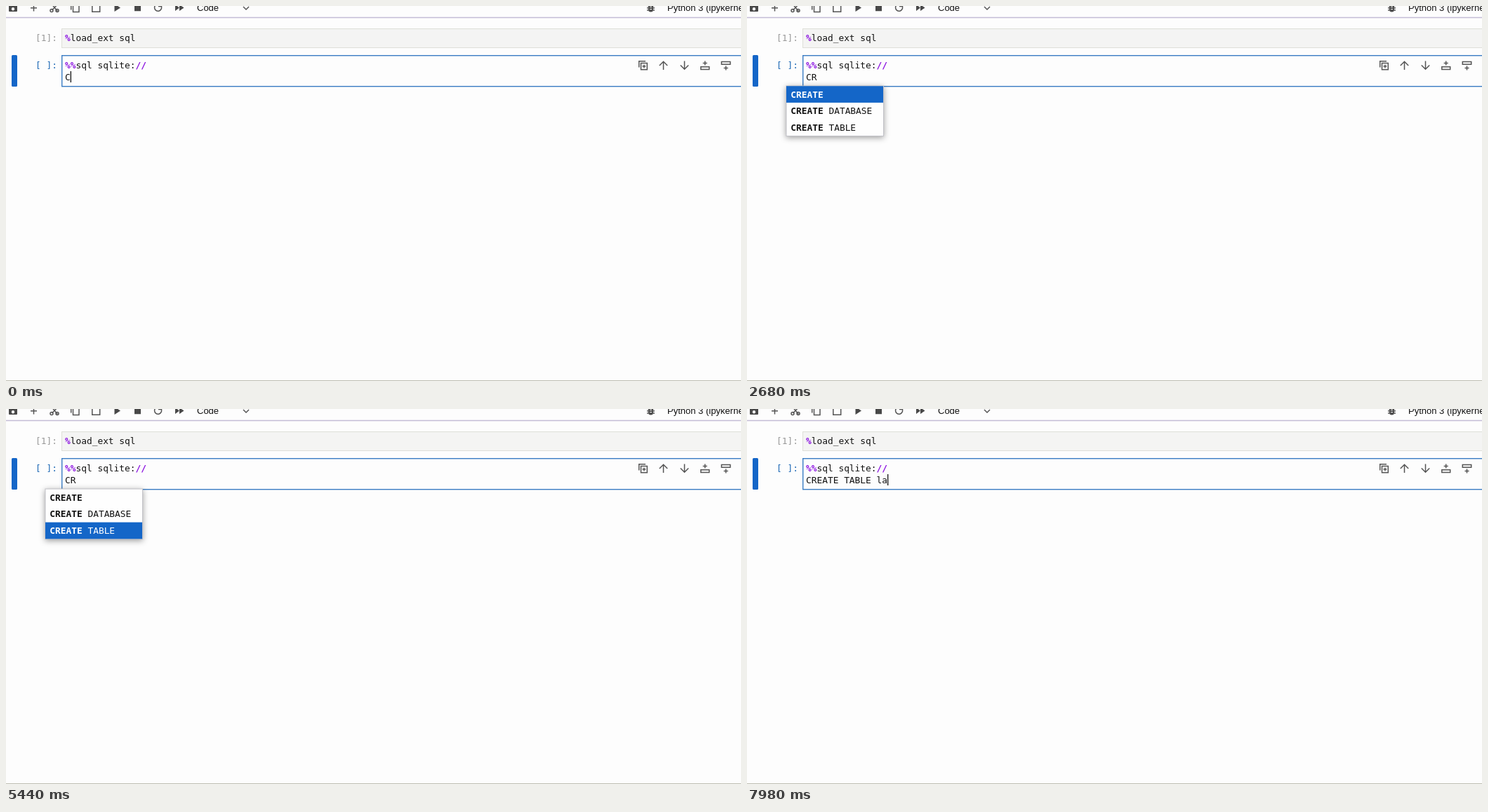
Write an HTML page that moves like this. It is 1047 by 535 pixels and loops after 8 s.

```html
<!DOCTYPE html>
<html lang="en">
<head>
<meta charset="utf-8">
<title>SQL completion in a notebook</title>
<style>
  html, body { margin: 0; width: 100%; height: 100%; overflow: hidden; background: #fdfdfd; }
  svg { display: block; }
  text { white-space: pre; }
  .code { font: 12.85px "DejaVu Sans Mono", monospace; fill: #111; }
  .ui { font: 13px "Liberation Sans", Arial, sans-serif; fill: #111; }
  .op { font-weight: bold; fill: #8a10e0; }
  .match { font-weight: bold; }
  .line { fill: none; stroke: #555; stroke-width: 1.5; }
  .solid { fill: #484848; }
  #popup { filter: drop-shadow(0 2px 4px rgba(0, 0, 0, .38)); }
</style>
</head>
<body>
<svg width="1047" height="535" viewBox="0 0 1047 535">
  <rect width="1047" height="535" fill="#fdfdfd"/>

  <!-- notebook toolbar -->
  <path class="solid" fill-rule="evenodd" d="M4-4H13L16-1V7Q16 8 15 8H5Q4 8 4 7ZM10 2A2.2 2.2 0 1 0 10 6.400A2.200 2.200 0 1 0 10 2Z"/>
  <path class="line" d="M39.500-2V7.500M35 2.700H44"/>
  <g class="line">
    <path d="M64-4L73.500 7.500M75-4L65.500 6"/>
    <circle cx="65" cy="6.500" r="2"/><circle cx="73" cy="6.500" r="2"/>
    <path d="M95.500-2H104V8.500H95.500ZM92.700-4V5.500"/>
    <path d="M122.800-3H133.700V8.300H122.800Z"/>
    <path d="M221 0A5 5 0 1 1 218-2.500M221.500-4V.5H217"/>
    <path d="M338 1L342 5L346 1"/>
  </g>
  <path class="solid" d="M154.500-3V8L163 2.500ZM183-2H192V7.200H183ZM241-2V7L247 2.500ZM247-2V7L253.500 2.500Z"/>
  <text class="ui" x="272" y="7">Code</text>
  <rect class="solid" x="915" y="-4" width="7" height="12.500" rx="3.500"/>
  <path class="line" d="M913-.5H924M913 2.700H924M913 6H924"/>
  <path d="M917 1.300H920M917 4.500H920" stroke="#fdfdfd"/>
  <text class="ui" x="942" y="7">Python 3 (ipykernel)</text>
  <path d="M0 16.500H1047" stroke="#c3bcd6" stroke-width="1.500"/>

  <!-- executed cell -->
  <rect x="79.500" y="32.500" width="980" height="27" fill="#f4f4f3" stroke="#dedfd8"/>
  <text class="code" x="73" y="50" text-anchor="end" style="fill:#999">[1]:</text>
  <text class="code" x="84" y="50"><tspan class="op">%</tspan>load_ext sql</text>

  <!-- active cell -->
  <rect x="8" y="70" width="8" height="45" rx="1.500" fill="#1466c8"/>
  <rect x="79.700" y="70.700" width="980" height="44" fill="#fdfdfd" stroke="#3a7cc4" stroke-width="1.400"/>
  <text class="code" x="73" y="88.500" text-anchor="end" style="fill:#1c68b5">[ ]:</text>
  <text class="code" x="84" y="88.500"><tspan class="op">%%</tspan>sql sqlite:<tspan class="op">//</tspan></text>
  <text class="code" id="typed" x="84" y="105.500"></text>
  <rect id="caret" y="93" width="1.200" height="16" fill="#000"/>
  <g class="line">
    <path d="M901.700 87.500V78.700H911M904.500 81.500H913.300V90.700H904.500ZM908.900 83.700V88.500M906.500 86.100H911.300"/>
    <path d="M936.500 91V79.500M930.800 85L936.500 79.300L942.200 85"/>
    <path d="M966.500 78.500V90M960.800 84.500L966.500 90.200L972.200 84.500"/>
    <path d="M989.800 86.700H1001.700V90.500H989.800ZM995.700 78.500V84.500M992.700 81.500H998.700"/>
    <path d="M1019.300 79.500H1031.700V83.300H1019.300ZM1025.500 85.500V91.500M1022.500 88.500H1028.500"/>
  </g>

  <g id="popup">
    <rect x="56" y="114" width="138.500" height="71.500" fill="#fefefe" stroke="#c2c2c8"/>
    <rect id="selection" x="56" width="138" height="23.700" fill="#1466c8"/>
    <g id="options"></g>
  </g>
  <path d="M0 534.500H1047" stroke="#bdbdb2"/>
</svg>
<script>
const LOOP = 8000;
const CHAR_WIDTH = 7.74;
const ROW_HEIGHT = 23.7;
const $ = id => document.getElementById(id);

// Each track is a list of [start time in ms, value].
const typing = [[0, "C"], [200, "CR"], [5780, "CREATE TABLE"], [7280, "CREATE TABLE "],
                [7560, "CREATE TABLE l"], [7840, "CREATE TABLE la"]];
const choice = [[0, -1], [2680, 0], [4700, 1], [5200, 2], [5780, -1]];
const slowBlink = [[0, true], [720, false], [1380, true], [1700, false]];

const valueAt = (track, t) => track.findLast(([start]) => start <= t)[1];

function caretVisible(t) {
  if (t < 2780) return valueAt(slowBlink, t);
  if (t >= 7280) return true;
  const blinkStart = t < 5780 ? 2780 : 5780;
  return (t - blinkStart) % 1060 < 530;
}

const options = ["", " DATABASE", " TABLE"].map((rest, row) => {
  $("options").insertAdjacentHTML("beforeend",
    `<text class="code" x="62.3" y="${130.5 + row * ROW_HEIGHT}"><tspan class="match">CREATE</tspan>${rest}</text>`);
  return $("options").lastElementChild;
});

function draw(now) {
  const t = now % LOOP;
  const text = valueAt(typing, t);
  const selected = valueAt(choice, t);

  $("typed").textContent = text;
  $("caret").setAttribute("x", 84 + text.length * CHAR_WIDTH);
  $("caret").style.display = caretVisible(t) ? "" : "none";

  $("popup").style.display = selected < 0 ? "none" : "";
  $("selection").setAttribute("y", 114.2 + Math.max(selected, 0) * ROW_HEIGHT);
  options.forEach((option, row) => option.style.fill = row === selected ? "#fff" : "#111");
}

const origin = performance.now();
function tick() {
  draw(performance.now() - origin);
  requestAnimationFrame(tick);
}
tick();
</script>
</body>
</html>
```
